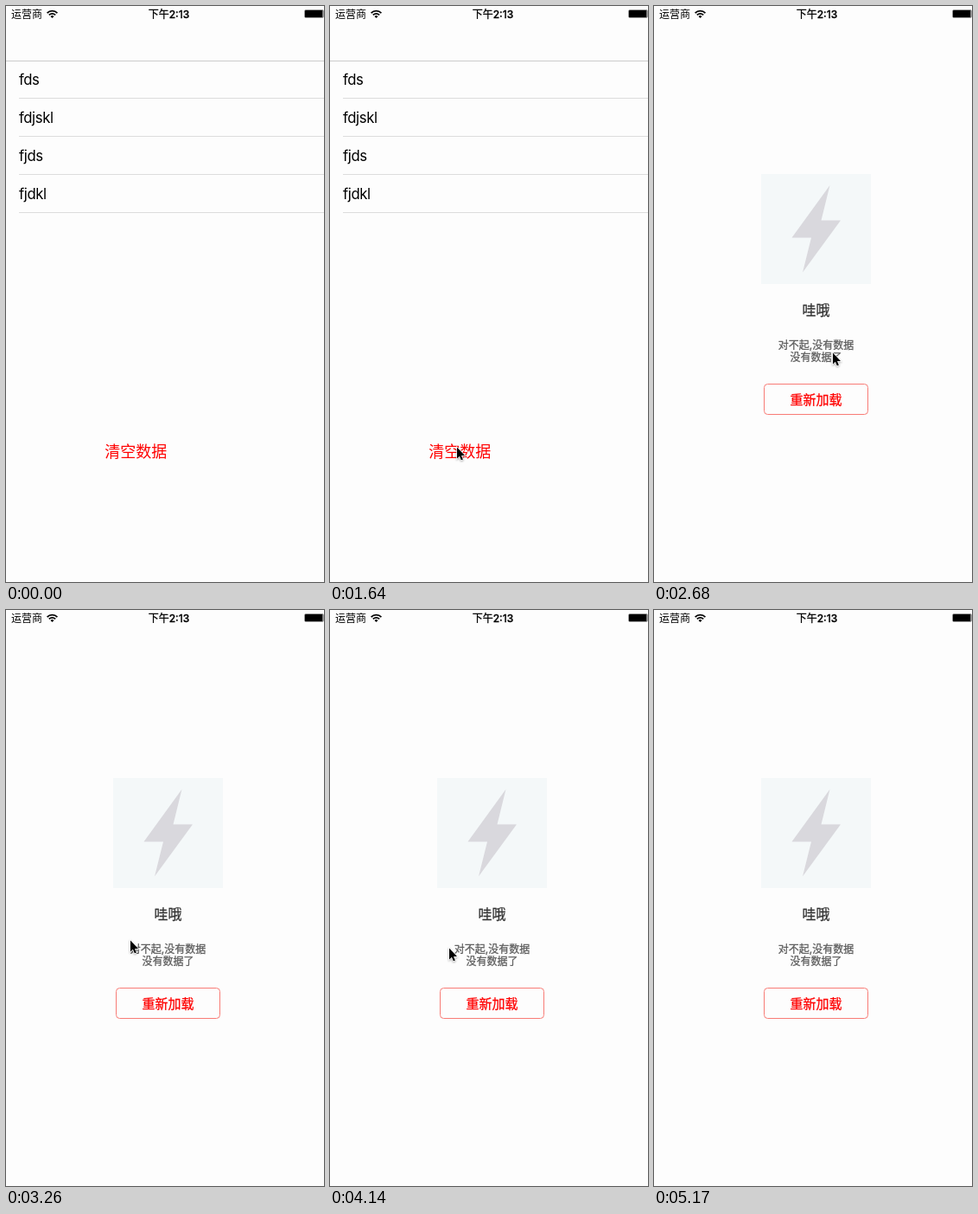
Write an HTML page that moves like this. It is 368 px wide and 665 px high and loops after 8000 ms.

```html
<!DOCTYPE html>
<html lang="zh-CN">
<meta charset="utf-8">
<style>
  html, body { margin: 0; width: 100%; height: 100%; overflow: hidden; background: #fdfdfd; }
  svg { display: block; font-family: Inter, "Noto Sans CJK SC", "Noto Sans CJK", sans-serif; }
  .medium { stroke: currentColor; stroke-width: .28; }
  .middle { text-anchor: middle; }
  .cell { font-size: 16.7px; letter-spacing: -.4px; }
</style>
<svg width="368" height="665" viewBox="0 0 368 665">
  <g id="status" font-size="12">
    <text x="6" y="13.5">运营商</text>
    <g fill="none" stroke="#000" stroke-width="1.7">
      <path d="M47.6 8.2a8.2 8.2 0 0 1 11.8 0M49.8 10.4a5.2 5.2 0 0 1 7.4 0"/>
      <path d="M53.5 14l-2-2a2.9 2.9 0 0 1 4 0z" fill="#000" stroke="none"/>
    </g>
    <text class="medium middle" x="188.5" y="13.5" font-weight="500">下午2:13</text>
    <rect x="345.5" y="4.5" width="22" height="9" rx="1.5" fill="#fff" stroke="#999"/>
    <rect x="346" y="5" width="20.5" height="8" rx=".5"/>
  </g>

  <g id="list">
    <path d="M0 63.5H368" stroke="#ccc"/>
    <text x="114.3" y="520.5" font-size="18" fill="#f00">清空数据</text>
  </g>

  <g id="empty" class="middle">
    <rect x="124" y="194" width="127" height="127" fill="#f4f8f9"/>
    <path d="M203.5 207L193.5 247.5H216L172 307.5L182 267.5H159.5z" fill="#d9d8dd"/>
    <text class="medium" x="187.5" y="357" font-size="16" fill="#333" color="#333">哇哦</text>
    <g class="medium" font-size="12" fill="#5c5c5c" color="#5c5c5c">
      <text x="187.5" y="395.5">对不起,没有数据</text>
      <text x="187.5" y="410">没有数据了</text>
    </g>
    <rect x="127.5" y="436.5" width="120" height="35" rx="4" fill="none" stroke="#f87c76"/>
    <text class="medium" x="187.5" y="459.7" font-size="15" fill="#f00" color="#f00">重新加载</text>
  </g>

  <path id="cursor" d="M0 -.5V12.5L2.9 9.8L4.8 14.3L6.9 13.4L5 9H9z" stroke="#fff" stroke-width="1.4"
    paint-order="stroke" style="filter: drop-shadow(0 1px 1px #0005)"/>
</svg>
<script>
  const LOOP = 8000, ENTER = 600, STEP = 147.1, CLEARED = 2080, GONE = 5170;
  const $ = id => document.getElementById(id);

  $('list').insertAdjacentHTML('beforeend', ['fds', 'fdjskl', 'fjds', 'fjdkl'].map((word, i) => {
    const y = 106.5 + 44 * i;
    return `<text class="cell" x="15" y="${y - 16}">${word}</text><path d="M15 ${y}H368" stroke="#ddd"/>`;
  }).join(''));

  const clamp = (v, lo, hi) => Math.min(hi, Math.max(lo, v));

  // Eases linearly from a to b between steps n0 and n1
  const slide = (n, n0, n1, a, b) => a + (b - a) * clamp((n - n0) / (n1 - n0), 0, 1);

  // Slide left onto the label, press, then rise to where the circling begins
  function approach(n) {
    if (n < 4) return [slide(n, 0, 2, 257, 182), 505];
    if (n < 11) return [slide(n, 4, 7, 177, 147), slide(n, 4, 7, 506, 510)];
    return [slide(n, 11, 14, 147, 207), slide(n, 11, 14, 510, 401)];
  }

  // Quickening ellipse that grows wider and flatter
  function circle(n) {
    const m = Math.min(n, 14);
    const angle = Math.PI * m * (.2 + .0108 * m);
    return [
      178 + (29 + 1.2 * m) * Math.cos(angle),
      392 - (32 - 1.3 * m) * Math.sin(angle - .28)
    ];
  }

  const show = (id, on) => $(id).setAttribute('visibility', on ? 'visible' : 'hidden');

  function draw(t) {
    const n = Math.floor((t - ENTER) / STEP);
    const [x, y] = n < 14 ? approach(n) : circle(n - 14);
    show('list', t < CLEARED);
    show('empty', t >= CLEARED);
    show('cursor', t >= ENTER && t < GONE);
    $('cursor').setAttribute('transform', `translate(${Math.round(x)} ${Math.round(y)})`);
  }

  const start = performance.now();
  function tick() {
    draw((performance.now() - start) % LOOP);
    requestAnimationFrame(tick);
  }
  tick();
</script>
</html>
```
